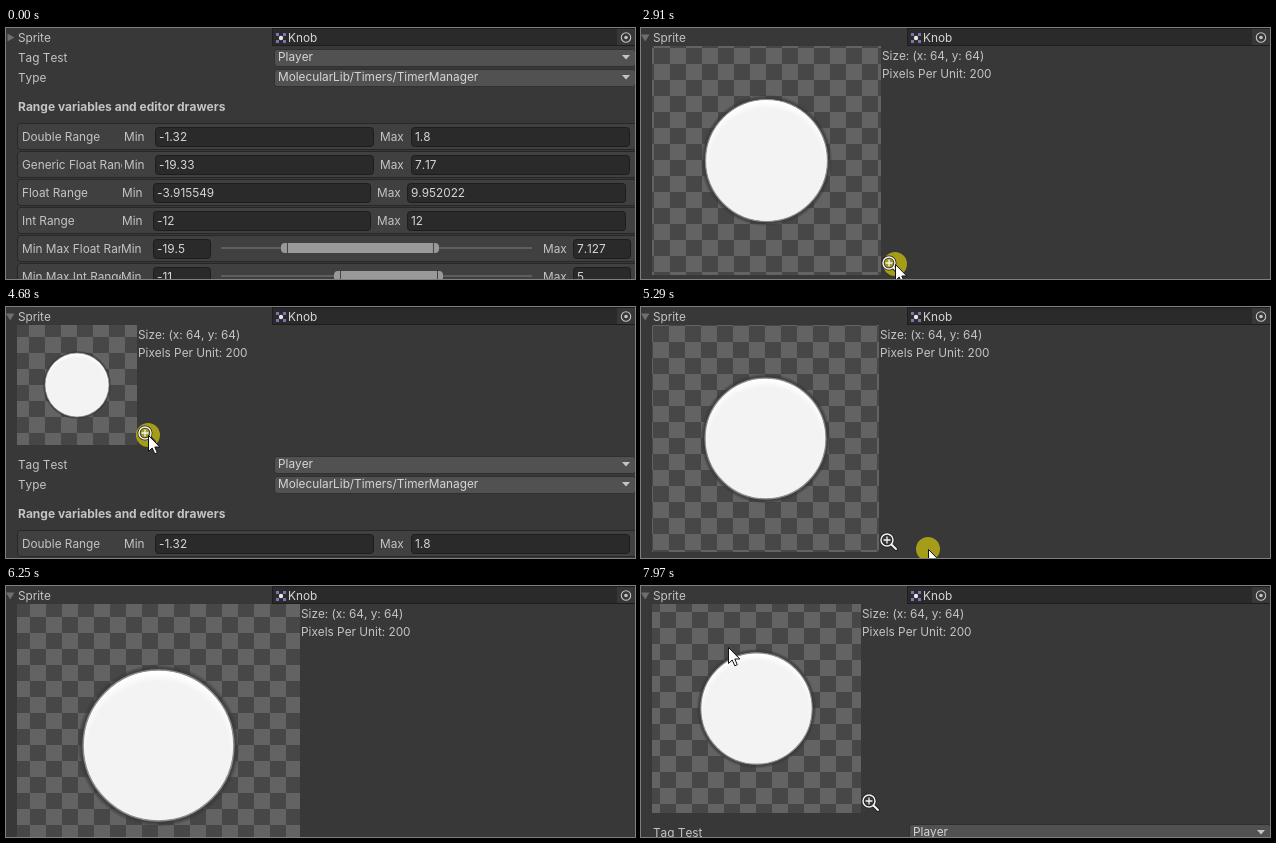
These frames come from a looping animation (629 px wide and 251 px high, 8000 ms). An HTML page:

```html
<!DOCTYPE html>
<html lang="en">
<head>
<meta charset="utf-8">
<title>Sprite preview inspector</title>
<style>
  html, body { margin: 0; width: 100%; height: 100%; overflow: hidden; background: #383838; }
  #stage { display: block; width: 629px; height: 251px; }
  text {
    font: 11.8px Inter, "Open Sans", sans-serif; fill: #c4c4c4; white-space: pre;
    font-kerning: none; font-variant-ligatures: none;
  }
  .value { fill: #d6d6d6; }
  .title { font-size: 12px; font-weight: 700; }
  .field { fill: #2a2a2a; stroke: #1d1d1d; }
  .row { fill: #404040; stroke: #272727; }
  .drop { fill: #515151; stroke: #303030; }
</style>
</head>
<body>
<svg id="stage" viewBox="0 0 629 251" xmlns="http://www.w3.org/2000/svg">
  <defs>
    <pattern id="checker" width="32" height="32" patternUnits="userSpaceOnUse">
      <rect width="32" height="32" fill="#636363"/>
      <path d="M0 0h16v16h-16zM16 16h16v16h-16z" fill="#474747"/>
    </pattern>
    <radialGradient id="face" cx="50%" cy="55%" r="55%">
      <stop offset=".86" stop-color="#f3f3f3"/>
      <stop offset=".97" stop-color="#fff"/>
    </radialGradient>
    <radialGradient id="rim">
      <stop offset=".9" stop-color="#444" stop-opacity=".95"/>
      <stop offset=".95" stop-color="#383838" stop-opacity=".75"/>
      <stop offset="1" stop-color="#383838" stop-opacity="0"/>
    </radialGradient>
  </defs>
  <rect width="629" height="251" fill="#383838"/>
  <g id="list"></g>
  <g id="preview">
    <rect id="board" x="11" y="18" fill="url(#checker)"/>
    <g id="knob">
      <circle r="66" fill="url(#rim)"/>
      <circle r="61" fill="url(#face)" stroke="#8c8c8c" stroke-width="1.2"/>
    </g>
    <g id="info">
      <text y="32">Size: (x: 64, y: 64)</text>
      <text y="50">Pixels Per Unit: 200</text>
    </g>
  </g>
  <g id="head">
    <path id="fold" fill="#6e6e6e"/>
    <text x="12" y="14">Sprite</text>
    <rect class="field" x="266.5" y=".5" width="370" height="17"/>
    <rect x="611" y="1" width="18" height="16" fill="#373737"/>
    <path d="M270 5h3v3h-3zM277 5h3v3h-3zM270 12h3v3h-3zM277 12h3v3h-3z" fill="#7d72b4"/>
    <circle cx="275" cy="10" r="2.2" fill="#e6e6e6"/>
    <text class="value" x="282" y="14">Knob</text>
    <circle cx="620" cy="9.5" r="4.7" fill="none" stroke="#c4c4c4" stroke-width="1.1"/>
    <circle cx="620" cy="9.5" r="1.8" fill="#c4c4c4"/>
  </g>
  <circle id="press" r="12" fill="#fff000" fill-opacity=".55"/>
  <g id="lens" fill="none" stroke-linecap="round">
    <path d="M3.5 3.5L8 8" stroke="#222" stroke-width="4"/>
    <circle cx="-1" cy="-1" r="6" stroke="#222" stroke-width="3"/>
    <circle cx="-1" cy="-1" r="6" stroke="#f2f2f2" stroke-width="1.5"/>
    <path d="M-4 -1h6M-1 -4v6" stroke="#f2f2f2" stroke-width="1.3"/>
    <path d="M3.5 3.5L8 8" stroke="#f2f2f2" stroke-width="2"/>
  </g>
  <path id="pointer" d="M.5 .5V16.5L4.2 13L6.8 18.8L9.3 17.7L6.8 12H11.8Z" fill="#fff" stroke="#111"/>
</svg>
<script>
const LOOP = 8000;
const $ = id => document.getElementById(id);

// List parts, measured from the bottom edge of the sprite field or preview.
const label = (x, y, s, cls = "") => `<text class="${cls}" x="${x}" y="${y + 4}">${s}</text>`;

const box = (cls, x, y, w, h, r) =>
  `<rect class="${cls}" x="${x + .5}" y="${y + .5}" width="${w}" height="${h}" rx="${r}"/>`;

const clipped = (x, y, w, s) =>
  `<svg x="${x}" y="${y - 10}" width="${w}" height="20" overflow="hidden">${label(0, 10, s)}</svg>`;

const field = (x, right, y, s) =>
  box("field", x, y - 10, right - x - 1, 19, 3) + label(x + 4, y, s, "value");

const dropdown = (y, name, s) =>
  label(12, y + 1, name) + box("drop", 268, y - 8, 361, 17, 3) + label(272, y, s, "value") +
  `<path d="M616 ${y - 2}h8l-4 4.5z" fill="#c4c4c4"/>`;

const rowY = i => 99 + 28 * i;
const rowBox = i => box("row", 11, rowY(i) - 14, 630, 26, 3);

function rangeRow(i, name, min, max) {
  const y = rowY(i), d = i > 1 ? 2 : 0;
  return rowBox(i) + clipped(16, y, 100 - d, name) +
    label(118 - d, y, "Min") + field(149 - d, 368 - 1.5 * d, y, min) +
    label(374 - 1.5 * d, y, "Max") + field(405 - 2 * d, 624 - 2 * d, y, max);
}

function sliderRow(i, name, min, max, from, to) {
  const y = rowY(i), mid = y - 1;
  return rowBox(i) + clipped(16, y, 99, name) +
    label(115, y, "Min") + field(147, 205, y, min) +
    `<rect x="215" y="${mid - 1}" width="311" height="2" fill="#5e5e5e"/>
     <rect x="${from}" y="${mid - 5}" width="${to - from}" height="10" rx="4" fill="#999"/>
     <path d="M${from + 6.5} ${mid - 5}v10M${to - 5.5} ${mid - 5}v10" stroke="#444"/>` +
    label(537, y, "Max") + field(567, 625, y, max);
}

$("list").innerHTML =
  dropdown(19, "Tag Test", "Player") +
  dropdown(39, "Type", "MolecularLib/Timers/TimerManager") +
  label(12, 69, "Range variables and editor drawers", "title") +
  rangeRow(0, "Double Range", "-1.32", "1.8") +
  rangeRow(1, "Generic Float Range", "-19.33", "7.17") +
  rangeRow(2, "Float Range", "-3.915549", "9.952022") +
  rangeRow(3, "Int Range", "-12", "12") +
  sliderRow(4, "Min Max Float Range", "-19.5", "7.127", 275, 433) +
  sliderRow(5, "Min Max Int Range", "-11", "5", 328, 437);

// time, preview size, pointer x, pointer y
const KEYS = [
  [590, 229, 29, 176], [1360, 229, 7, 7], [1950, 229, 7, 7], [2710, 229, 256, 238],
  [2780, 229, 256, 238], [2910, 229, 254, 236], [3300, 152, 166, 152], [3750, 61, 72, 62],
  [3950, 42, 50, 44], [4400, 85, 100, 90], [4900, 152, 182, 163], [5290, 227, 287, 242],
  [5700, 312, 375, 325], [6250, 283, 320, 296], [6700, 172, 193, 180], [7000, 139, 157, 145],
  [7350, 180, 190, 184], [7760, 209, 200, 204], [7970, 209, 87, 61]
];

const slope = (k, c) => k < 0 || k >= KEYS.length - 1 ? 0 :
  (KEYS[k + 1][c] - KEYS[k][c]) / (KEYS[k + 1][0] - KEYS[k][0]);

// Harmonic mean keeps the curve from overshooting its keys.
function tangent(k, c) {
  const a = slope(k - 1, c), b = slope(k, c);
  return a * b <= 0 ? 0 : 2 * a * b / (a + b);
}

function track(t, c) {
  const last = KEYS.length - 1;
  if (t <= KEYS[0][0]) return KEYS[0][c];
  if (t >= KEYS[last][0]) return KEYS[last][c];
  const k = KEYS.findIndex(key => key[0] > t) - 1;
  const [p, q] = [KEYS[k], KEYS[k + 1]];
  const d = q[0] - p[0], u = (t - p[0]) / d, v = 1 - u;
  return v * v * (1 + 2 * u) * p[c] + u * u * (3 - 2 * u) * q[c] +
    d * u * v * (v * tangent(k, c) - u * tangent(k + 1, c));
}

const show = (id, on) => $(id).setAttribute("display", on ? "inline" : "none");
const move = (id, x, y, extra = "") =>
  $(id).setAttribute("transform", `translate(${x} ${y})${extra}`);

function draw(t) {
  const open = t >= 1490;
  const size = Math.round(track(t, 1));
  const cx = 11 + size / 2, cy = 18 + size / 2;
  const px = Math.round(track(t, 2)), py = Math.round(track(t, 3));

  $("fold").setAttribute("d", open ? "M0 6.5H8.5L4.2 13.5Z" : "M1.5 5.5V13.5L8.5 9.5Z");
  move("list", 0, open ? 18 + size : 10);

  show("preview", open);
  show("lens", open);
  $("board").setAttribute("width", size);
  $("board").setAttribute("height", size);
  $("checker").setAttribute("patternTransform", `translate(${Math.floor(cx)} ${Math.floor(cy)})`);
  move("knob", cx, cy, ` scale(${size / 229})`);
  move("info", size + 12, 0);
  move("lens", size + 20, size + 7);

  show("pointer", t >= 590);
  move("pointer", px, py);
  show("press", (t >= 1430 && t < 1620) || (t >= 2780 && t < 7830));
  move("press", px, py);
}

const start = performance.now();
function tick() {
  draw((performance.now() - start) % LOOP);
  requestAnimationFrame(tick);
}
tick();
</script>
</body>
</html>
```
